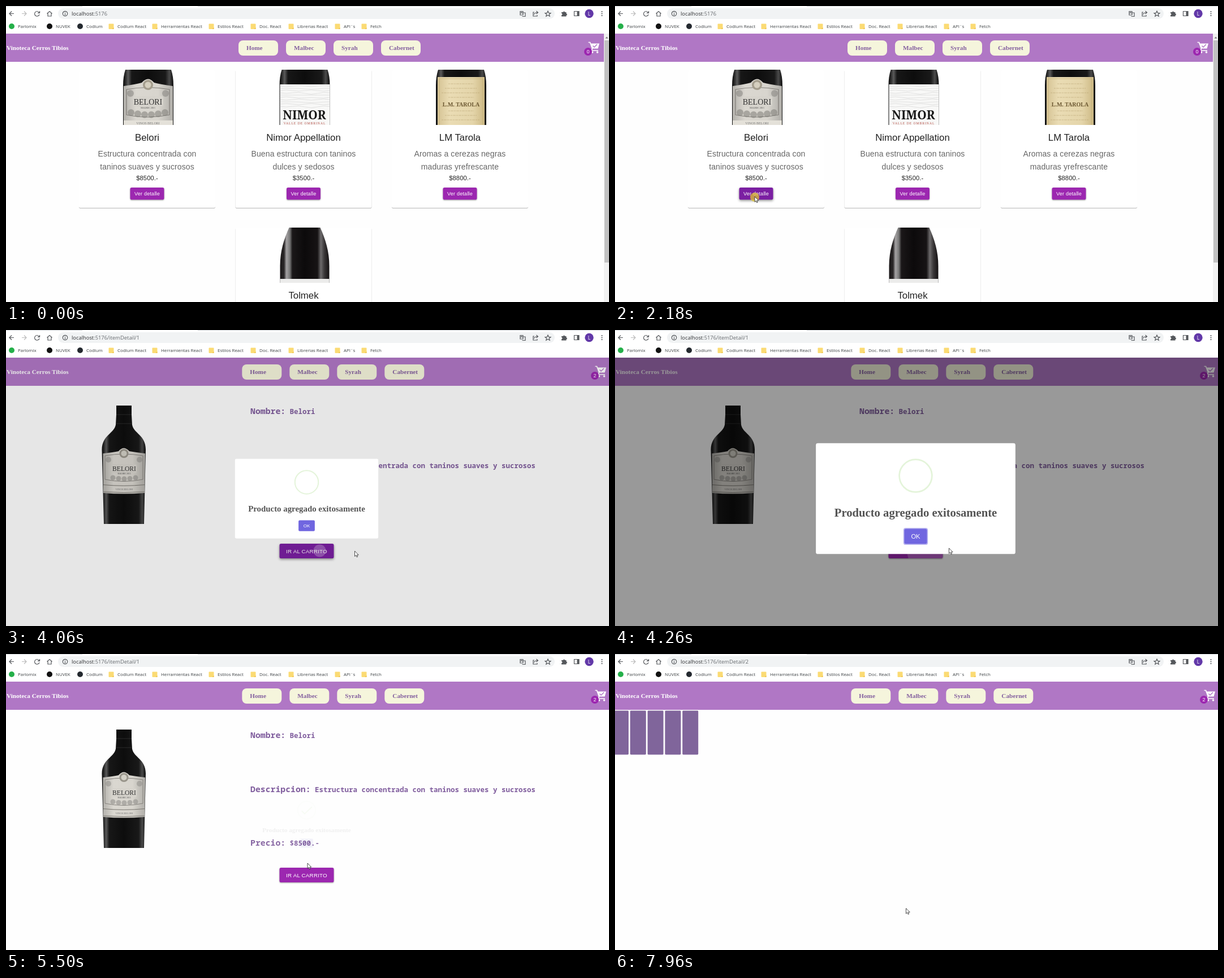
An HTML page that plays this animation: 1066x525 px, repeating every 8 s.

```html
<!DOCTYPE html>
<html lang="es">
<head>
<meta charset="utf-8">
<title>Vinoteca</title>
<style>
html, body { margin: 0; width: 100%; height: 100%; overflow: hidden; background: #fefefe; }
#stage { display: block; width: 100vw; height: 100vh; }
text { font-family: "Liberation Sans", Arial, sans-serif; white-space: pre; }
.s { font-family: "Liberation Serif", "Times New Roman", serif; }
.m { font-family: "Noto Sans Mono", "DejaVu Sans Mono", monospace; }
.u { font-family: "Open Sans", "Noto Sans", sans-serif; }
.n { font-family: "Noto Serif", serif; }
.b { font-weight: bold; }
.c { text-anchor: middle; }
.card { filter: drop-shadow(0 1px .5px rgba(0,0,0,.28)); }
.btn > rect { filter: drop-shadow(0 1px 1px rgba(0,0,0,.38)); }
.btn.hover > rect { fill: #7b1fa2; filter: drop-shadow(0 2px 2px rgba(0,0,0,.42)); }
#ok.hover { fill: #5a52b3; }
.icon { fill: none; stroke: #55585c; stroke-width: 1.2; }
</style>
</head>
<body>
<svg id="stage" viewBox="0 0 1066 525" preserveAspectRatio="none"></svg>
<script>
const LOOP = 8000, PURPLE = '#9c27b0', LILAC = '#7f5c9d', GREY = '#666', NAV = '#b077c5';

const rect = (x, y, w, h, fill, r = 0, attrs = '') =>
  `<rect x="${x}" y="${y}" width="${w}" height="${h}" rx="${r}" fill="${fill}" ${attrs}/>`;
const text = (x, y, str, size, fill, cls = '', attrs = '') =>
  `<text x="${x}" y="${y}" font-size="${size}" fill="${fill}" class="${cls}" ${attrs}>${str}</text>`;
const path = (d, fill, attrs = '') => `<path d="${d}" fill="${fill}" ${attrs}/>`;
const line = (d, color, width = 1, attrs = '') => path(d, 'none', `stroke="${color}" stroke-width="${width}" ${attrs}`);
const circle = (x, y, r, fill, attrs = '') => `<circle cx="${x}" cy="${y}" r="${r}" fill="${fill}" ${attrs}/>`;
const group = (id, body) => `<g id="${id}">${body}</g>`;
const times = (n, f) => Array.from({ length: n }, (_, i) => f(i)).join('');
const gradient = (id, stops) => `<linearGradient id="${id}">${stops.map(([o, c]) =>
  `<stop offset="${o}" stop-color="${c}"/>`).join('')}</linearGradient>`;

const buttons = [];
function button(x, y, w, h, label, size, id = '') {
  const n = buttons.push({ x, y, w, h });
  return `<g class="btn" id="${id || 'btn' + n}">${rect(x, y, w, h, PURPLE, 2.8)}
    ${text(x + w / 2, y + h / 2 + size * .36, label, size, '#fff', 'c', 'letter-spacing=".2"')}
    <svg x="${x}" y="${y}" width="${w}" height="${h}">${circle(0, 0, 0, '#fff')}</svg></g>`;
}

// Bottle photographs, simplified to flat shapes
const body = 'M82 0Q78 12 78 28V98H167V28Q167 12 163 0Z';
const art = [
  () => path(body, 'url(#glass)') +
    path('M79 29Q100 26 111 23Q122 10 133 23Q144 26 166 29V98H79Z', 'url(#silver)') +
    line('M84 35Q122 28 160 35V80Q122 88 84 80Z', '#7d7a75', 1.2) +
    times(6, i => circle(92 + i * 12, 76 + 4 * Math.sin(i * .63), 6, '#7f7d79', 'opacity=".55"')) +
    times(2, i => circle(91 + i * 62, 42, 6, '#7f7d79', 'opacity=".5"')) +
    circle(122, 27, 9, '#a49d8d') + circle(122, 27, 5.5, '#d5cfbf') +
    rect(96, 47, 53, 18, '#d6d3cc', 3) +
    text(122, 62, 'BELORI', 14, '#333', 's c') + text(122, 69, 'MALBEC 2015', 4, '#444', 's c') +
    rect(79, 90, 87, 8, '#e4e1d9') + text(122, 97, 'VINOS BELORI', 6, '#777', 's c'),
  () => path(body, 'url(#glass)') + rect(79, 26, 88, 72, '#f8f8f7') +
    times(10, i => line(`M79 ${29 + i * 4}q11 ${2 - i % 3 * 2} 22 0t22 ${i % 2}t22 0t22 ${-(i % 2)}`, '#c6c6c6', .5)) +
    text(122, 88, 'NIMOR', 21, '#161616', 'n b c') +
    text(122.5, 97, 'VALLE DE OMBRINAL', 5.6, '#b24a42', 's c', 'letter-spacing="1"'),
  () => path(body, 'url(#glass)') + rect(81, 13, 83, 85, 'url(#cream)') +
    rect(84, 16, 77, 90, 'none', 0, 'stroke="#c4ae78" stroke-width=".7"') +
    times(9, i => i == 4 ? '' : line(`M${100 - i % 3 * 6} ${25 + i * 8}h${45 + i % 3 * 11}`, '#a58f5c', .8,
      'stroke-dasharray="3 1 5 1" opacity=".55"')) +
    text(122.5, 65, 'L.M. TAROLA', 10, '#6b5731', 's b c'),
  () => path('M95 0C86 20 79 42 79 68V98H166V68C166 42 159 20 150 0Z', 'url(#shine)') +
    rect(79, 91, 87, 7, '#ececeb')
];

const wines = [
  ['Belori', 'Estructura concentrada con', 'taninos suaves y sucrosos', '$8500.-'],
  ['Nimor Appellation', 'Buena estructura con taninos', 'dulces y sedosos', '$3500.-'],
  ['LM Tarola', 'Aromas a cerezas negras', 'maduras yrefrescante', '$8800.-'],
  ['Tolmek', '', '', '']
];
function card(x, y, i) {
  const [name, line1, line2, price] = wines[i], mid = x + 120.5;
  const note = 'letter-spacing=".1"';
  return rect(x, y, 241, 245, '#fff', 2.8, 'class="card"') +
    `<svg x="${x}" y="${y}" width="241" height="98">${art[i]()}</svg>` +
    text(mid, y + 126, name, 16.8, '#212121', 'c') +
    text(mid, y + 154, line1, 14, GREY, 'c', note) +
    text(mid, y + 176.5, line2, 14, GREY, 'c', note) +
    text(mid, y + 196, price, 11.2, '#212121', 'c', note) +
    button(x + 90.5, y + 209, 60, 21.5, 'Ver detalle', 9.1);
}

function chrome() {
  const marks = [[21, 'Parlomix', '#25b04a'], [88, 'NUVEK', '#111'], [142, 'Codlum', '#24292f'],
    [197, 'Codlum React'], [274, 'Herramientas React'], [374, 'Estilos React'], [448, 'Doc. React'],
    [515, 'Librerias React'], [597, 'API´s'], [644, 'Fetch']];
  return rect(0, 0, 1066, 49, '#fff') + rect(0, 0, 135, 1, '#d5d8dc') + rect(339, 0, 727, 1, '#d5d8dc') +
    rect(92, 4, 878, 19, '#f1f3f4', 9.5) +
    `<g class="icon">
      <path d="M14 13.5H6M10 9.5L6 13.5L10 17.5"/>
      <path d="M28 13.5H36M32 9.5L36 13.5L32 17.5" stroke="#bbb"/>
      <path d="M58.5 11.5A4.3 4.3 0 1 0 59 15M59.5 9V12.3H56"/>
      <path d="M72.5 13.5L77 9.5L81.5 13.5M74 13V18H80V13"/>
      <circle cx="104.5" cy="13.5" r="4.2"/><path d="M104.5 13V16M104.5 11V12"/>
      <path d="M909 9.5H914V16H909ZM914 12H918V18.5H912.5M910 13L911.5 11L913 13"/>
      <path d="M934 11H932V18H939V16M933.5 15Q934.5 11.5 940 11.5M937.5 9L940.5 11.5L937.5 14"/>
      <path d="M958 9L959.5 12.3L963 12.5L960.3 14.8L961.2 18.2L958 16.3L954.8 18.2L955.7 14.8L953 12.5L956.5 12.3Z"/>
      <path d="M1004.5 9.5H1013V17.5H1004.5Z"/></g>` +
    path('M982 11H985A1.5 1.5 0 0 1 988 11H990.5V13.5A1.5 1.5 0 0 1 990.5 16.5V18.5H982V16A1.5 1.5 0 0 0 982 13Z', '#55585c') +
    rect(1009.5, 9.5, 3.5, 8, '#55585c') +
    circle(1031, 13.5, 7.7, '#6238a8') + text(1031, 16.5, 'L', 8.5, '#fff', 'u c') +
    times(3, i => circle(1053.5, 10 + i * 3.5, 1.1, '#55585c')) +
    `<text x="116" y="17" font-size="9.35" fill="#303134" class="u">localhost<tspan fill="#666a6e">:5176</tspan><tspan id="route" fill="#666a6e"></tspan></text>` +
    marks.map(([x, s, dot]) => (dot ? circle(x - 11, 36, 5, dot) :
      rect(x - 15.5, 31.5, 9, 9.5, '#fbdb74', 1) + path(`M${x - 9.5} 41l3 -3v3z`, '#eec14e')) +
      text(x, 39, s, 7.9, '#3c4043', 'u')).join('');
}

function navbar() {
  return rect(0, 49, 1066, 50, NAV) + text(1, 78, 'Vinoteca Cerros Tibios', 11.2, '#fff', 's b') +
    group('menu', ['Home', 'Malbec', 'Syrah', 'Cabernet'].map((s, i) =>
      rect(411 + 84 * i, 61, 70, 27, '#f5f5dc', 8) + text(425 + 84 * i, 78, s, 11.2, '#84609f', 's b')).join('')) +
    group('cart', path('M1033 66.5H1049L1046.5 75.5H1036Z', '#fff') +
      line('M1029.5 64.5H1032.5L1036.5 75.5L1035 79H1047', '#fff', 1.7) +
      line('M1037.5 70.5L1040 73L1045 68', NAV, 1.5) +
      circle(1036.5, 82, 1.8, '#fff') + circle(1045.5, 82, 1.8, '#fff') +
      circle(1029, 81, 7, PURPLE) + text(1029, 84.2, '0', 9, '#fff', 'c', 'id="badge"'));
}

function detail() {
  const field = (y, label, value, x) => text(432, y, label, 14.8, LILAC, 'm b') + text(x, y, value, 12.5, LILAC, 'm b');
  return path('M195 134H222V150L223 168C226 184 247 186 247 212L244 344H173L169.5 212C170 186 191 184 194 168L195 150Z', 'url(#glass)') +
    line('M195 150H222M194 166H223', '#333', .8) +
    path('M171.5 219Q190 217 199 215Q208 204 218 215Q230 217 246 219L245 289Q208 292 172 289Z', 'url(#silver)') +
    line('M175 223Q208 217 242 223V265Q208 272 175 265Z', '#85827d') +
    times(5, i => circle(189 + i * 10, 262 + 2 * Math.sin(i * .78), 4.5, '#8c8a86', 'opacity=".55"')) +
    times(2, i => circle(181 + i * 55, 230, 5, '#8c8a86', 'opacity=".5"')) +
    circle(208.5, 219, 8, '#99958b') + circle(208.5, 219, 5, '#d2cfc5') +
    rect(187, 238, 44, 16, '#d6d3cc', 3) +
    text(209, 250, 'BELORI', 11.6, '#333', 's c') + text(209, 256, 'MALBEC 2015', 3.6, '#444', 's c') +
    line('M172 274.5Q208 278 245 274.5M172 287Q208 290 245 287', '#77746e') +
    text(209, 283.5, 'VINOS BELORI', 4.5, '#777', 's c') +
    field(149, 'Nombre:', 'Belori', 501.5) +
    field(245, 'Descripcion:', 'Estructura concentrada con taninos suaves y sucrosos', 546) +
    field(340, 'Precio:', '$8500.-', 501.5) +
    group('counter', button(383, 379, 44.5, 26, '-', 9.8) + text(452.5, 394, '1', 16.8, '#000', 's b c', 'id="count"') +
      button(478, 379, 44.5, 26, '+', 9.8, 'plus') + button(544, 379, 136.5, 26, 'AGREGAR AL CARRITO', 9.8)) +
    button(483.5, 379, 96, 26, 'IR AL CARRITO', 9.8, 'go');
}

const popup = rect(-179, -99.7, 358, 199.5, '#fff', 3.5) +
  circle(0, -41, 29.3, 'none', 'stroke="#e4f4da" stroke-width="2.8"') +
  line('M-16.5 -39L-6.5 -29L17.5 -52', '#a5dc86', 3.6, 'id="check" pathLength="100" stroke-dasharray="100"') +
  text(0, 32, 'Producto agregado exitosamente', 21, '#545454', 's b c') +
  rect(-22, 52.8, 44, 30.5, '#b7b2ef', 4, 'id="ring"') + rect(-20.3, 54.5, 40.6, 27, '#7066e0', 2.8, 'id="ok"') +
  text(0, 72, 'OK', 11.4, '#fff', 'c');

stage.innerHTML = `<defs>
  ${gradient('glass', [[0, '#0b0b0b'], [.05, '#2c2c2c'], [.1, '#5a5a5a'], [.17, '#171717'], [.5, '#0d0d0d'], [.84, '#191919'], [.92, '#4a4a4a'], [1, '#0a0a0a']])}
  ${gradient('shine', [[0, '#1a1718'], [.08, '#2a2728'], [.13, '#a5a3a4'], [.2, '#777'], [.25, '#1a1718'], [.5, '#0c0a0b'], [.76, '#161314'], [.83, '#6d6b6c'], [.9, '#3a3738'], [1, '#141112']])}
  ${gradient('silver', [[0, '#b3b1ac'], [.25, '#dad7d0'], [.7, '#d8d5ce'], [1, '#b0aea9']])}
  ${gradient('cream', [[0, '#d5c394'], [.25, '#eadcb4'], [.75, '#e4d5aa'], [1, '#cdb985']])}</defs>` +
  rect(0, 49, 1066, 476, '#fefefe') +
  group('home', [0, 1, 2].map(i => card(129 + 276.5 * i, 113, i)).join('') + card(405.5, 393, 3)) +
  group('category', card(405.5, 229, 1)) +
  group('detail', detail()) +
  group('loader', times(5, i => rect(-4 + 30.8 * i, 100.5, 28, 78, '#80659b', 1.4))) +
  navbar() +
  group('scroll', rect(1057, 49, 9, 476, '#f1f1f1') + path('M1059.5 57.5L1062 54.5L1064.5 57.5Z', '#777') +
    rect(1058, 61, 8, 394, '#c1c1c1', 0, 'id="thumb"')) +
  rect(0, 49, 1066, 476, '#000', 0, 'id="shade"') + group('popup', popup) + chrome() +
  group('cursor', circle(0, 1, 8, '#dfc632', 'id="press" opacity=".75"') +
    path('M0 0V9.5L2.2 7.5L3.7 10.8L5.2 10.1L3.8 7H6.8Z', '#fff', 'id="arrow" stroke="#222" stroke-width=".8"') +
    path('M-1 1V7L-3 6L-3.6 7.2L0 13H6L7.5 9V5L1.5 4V1Q.2 -.7 -1 1Z', '#fff', 'id="hand" stroke="#222" stroke-width=".8"'));

const $ = id => document.getElementById(id);
const show = (id, on) => $(id).style.visibility = on ? 'visible' : 'hidden';
const set = (el, attrs) => { for (const k in attrs) el.setAttribute(k, attrs[k]); };
const clamp = v => Math.max(0, Math.min(1, v));
const smooth = v => v * v * (3 - 2 * v);

// Piecewise track through [time, ...values]
function track(keys, t, ease) {
  const i = keys.findIndex(k => k[0] > t);
  if (i < 0) return keys[keys.length - 1].slice(1);
  if (!i) return keys[0].slice(1);
  const a = keys[i - 1], b = keys[i], p = ease((t - a[0]) / (b[0] - a[0]));
  return a.slice(1).map((v, j) => v + (b[j + 1] - v) * p);
}

const moves = [[390, 772, 526], [580, 500, 440], [780, 225, 347], [940, 345, 412], [1270, 345, 412],
  [2040, 247, 338], [2350, 247, 338], [2910, 505, 393], [3380, 508, 393], [3450, 519, 394.5], [3720, 612, 392],
  [4060, 616.5, 392], [4530, 550, 379], [4800, 532, 371], [5500, 533, 371], [5760, 543, 357],
  [5830, 543, 357], [6620, 606, 72], [6850, 606, 72], [7470, 514.5, 451]];
const presses = [[2110, 2240], [3310, 3420], [3930, 4040], [5290, 5400], [6740, 6850], [7700, 7900]];
const pop = [[0, .7], [.45, 1.05], [.8, .95], [1, 1]];
const routes = { home: '', category: '/category/Syrah', detail: '/itemDetail/1' };

function ripple(id, x, y, size, age) {
  const p = clamp(age / 550);
  set(document.querySelector(`#${id} circle`), { cx: x, cy: y, r: size * p, opacity: .25 * clamp(1 - (age - 350) / 350) });
}

function draw(t) {
  const scene = t < 2240 ? 'home' : t < 2560 ? 'loader' : t < 6850 ? 'detail' : t < 7940 ? 'category' : 'loader';
  const added = t >= 4000, scrolled = scene == 'home' || scene == 'category';
  for (const s of ['home', 'category', 'detail', 'loader']) $(s).style.display = s == scene ? '' : 'none';
  $('route').textContent = routes[scene] ?? '/itemDetail/' + (added ? 2 : 1);
  show('scroll', scrolled);
  set($('thumb'), { height: scene == 'home' ? 394 : 433 });
  set($('menu'), { transform: `translate(${scrolled ? 0 : 6.3})` });
  set($('cart'), { transform: `translate(${scrolled ? 0 : 12})` });
  $('badge').textContent = added ? 2 : 0;
  $('count').textContent = t < 3400 ? 1 : 2;
  show('counter', !added);
  show('go', added);

  const since = t - (added ? 7940 : 2240);
  [...$('loader').children].forEach((bar, i) => {
    const phase = Math.max(0, since / 1000 - i * .1) % 1;
    const h = 78 * (1 - .6 * smooth(1 - Math.abs(2 * phase - 1)));
    set(bar, { y: 139.5 - h / 2, height: h });
  });

  const [x, y] = track(moves, t, smooth);
  const over = (l, top, w, h) => x >= l && x <= l + w && y >= top && y <= top + h;
  document.querySelectorAll('.btn').forEach((el, i) => {
    const b = buttons[i];
    el.classList.toggle('hover', over(b.x, b.y, b.w, b.h) || el.id == 'go' && t < 4200);
  });
  $('ok').classList.toggle('hover', t > 4300 && over(511, 353, 41, 28));
  ripple('plus', 31, 14, 40, t - 3310);
  ripple('go', 71, 12.5, 75, t - 3980);

  const leave = clamp((t - 5362) / 150);
  const scale = track(pop, (t - 4058) / 300, v => v)[0] - .5 * leave;
  show('popup', t >= 4050 && leave < 1);
  set($('popup'), { transform: `translate(531.5 299) scale(${scale})`, opacity: 1 - leave });
  set($('shade'), { opacity: .4 * (clamp((t - 4037) / 100) - clamp((t - 5362) / 100)) });
  const drawn = clamp((t - 4480) / 250);
  set($('check'), { 'stroke-dashoffset': 100 * (1 - smooth(drawn)), opacity: drawn ? 1 : 0 });
  set($('ring'), { opacity: t > 4150 ? 1 : 0 });

  const hand = t > 2850 && t < 3900, seen = t >= 390;
  set($('cursor'), { transform: `translate(${x} ${y})` });
  show('arrow', seen && !hand);
  show('hand', seen && hand);
  show('press', presses.some(([a, b]) => t >= a && t < b));
}

const start = performance.now();
function frame() {
  draw((performance.now() - start) % LOOP);
  requestAnimationFrame(frame);
}
frame();
</script>
</body>
</html>
```
